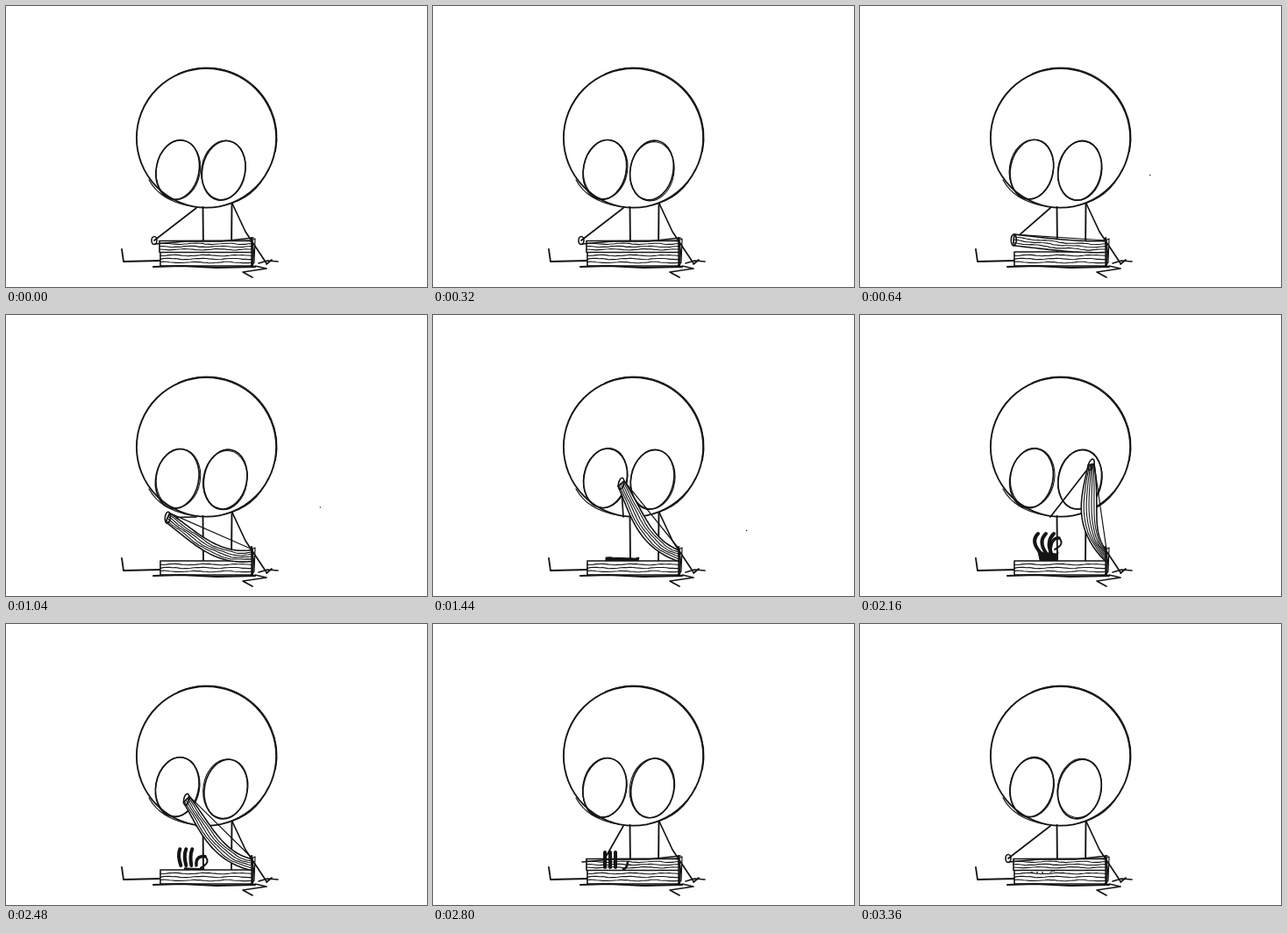
Animation of 480x320 px, one loop 3440 ms. Source, as an HTML page with a canvas:

```html
<!DOCTYPE html>
<html lang="en">
<head>
<meta charset="utf-8">
<title>Book with a claw</title>
<style>
html, body { margin: 0; width: 100%; height: 100%; overflow: hidden; background: #fff; }
canvas { display: block; }
</style>
</head>
<body>
<canvas id="c" width="480" height="320"></canvas>
<script>
const g = document.getElementById('c').getContext('2d');
const LOOP = 3440, STEP = 80, INK = '#141414';
const HINGE = { x: 280, y: 274 }, COVER = 105;

const mix = (a, b, k) => a + (b - a) * k;
const ramp = (t, from, to) => Math.min(1, Math.max(0, (t - from) / (to - from)));
const smooth = k => k * k * (3 - 2 * k);
const noise = n => { const v = Math.sin(n * 127.1) * 43758.5453; return (v - Math.floor(v)) * 2 - 1; };

function trace(points, width, fill) {
  g.beginPath();
  points.forEach(p => g.lineTo(p[0], p[1]));
  if (fill) { g.fillStyle = fill; g.fill(); }
  g.lineWidth = width;
  g.stroke();
}

function line(width, ...v) {
  const points = [];
  for (let i = 0; i < v.length; i += 2) points.push([v[i], v[i + 1]]);
  trace(points, width);
}

function bend(width, x0, y0, x1, y1, x2, y2) {
  g.beginPath();
  g.moveTo(x0, y0);
  g.quadraticCurveTo(x1, y1, x2, y2);
  g.lineWidth = width;
  g.stroke();
}

function oval(width, x, y, rx, ry, turn = 0) {
  g.beginPath();
  g.ellipse(x, y, rx, ry, turn, 0, 7);
  g.lineWidth = width;
  g.stroke();
}

// White board between two edges, with wavy wood grain.
function board(top, bottom, grains, seed) {
  trace([...top, ...bottom.slice().reverse(), top[0]], 1.6, '#fff');
  for (let k = 1; k <= grains; k++)
    trace(top.map((p, i) => {
      const wave = 0.6 * Math.sin(i * 0.6 + k + seed) + 0.3 * noise(i + k * 40);
      const q = bottom[i], v = k / (grains + 1);
      return [mix(p[0], q[0], v), mix(p[1], q[1], v) + wave];
    }), 1.1);
}

// The cover swings on its hinge, sags in the middle and thins towards the tip.
function coverShape(open) {
  const angle = Math.PI * (1 - 0.45 * open), sag = 22 * Math.min(1, open * 3.5);
  const dx = -Math.cos(angle), dy = Math.sin(angle);
  const tip = { x: HINGE.x - COVER * dx, y: HINGE.y - COVER * dy };
  const top = [], bottom = [];
  for (let i = 0; i <= 30; i++) {
    const u = i / 30, w = 1 - u;
    const drop = 3 * u * w * sag * (0.3 * w + u);
    const x = tip.x + COVER * u * dx - drop * dy;
    const y = tip.y + COVER * u * dy + drop * dx;
    const half = mix(mix(6.5, 3.5, open), 6.5, u) + 5 * open * open * Math.sin(Math.PI * u);
    const nx = mix(-dy, 0, u ** 3) * half, ny = mix(dx, 1, u ** 3) * half;
    top.push([x - nx, y - ny]);
    bottom.push([x + nx, y + ny]);
  }
  return { tip, top, bottom, angle };
}

function head(t) {
  oval(1.9, 228.5, 150.3, 79.6, 79.3);
  g.beginPath();
  g.arc(229, 150, 80, -2, 0.2);
  g.lineWidth = 1;
  g.stroke();
  bend(1.2, 163, 198, 176, 222, 211, 228);
  bend(1.2, 248, 227, 284, 220, 299, 186);

  const shift = 2 * ramp(t, 0, 640);
  [[196, 186], [248.2 + shift, 187.5]].forEach(([x, y], i) => {
    const wobble = k => 0.8 * noise(t / STEP * 3 + i * 50 + k + 1);
    oval(1.7, x + wobble(0), y + wobble(1), 24.4, 34.2, 0.2);
    oval(1.1, x + wobble(2), y + wobble(3), 25, 33.8, 0.16);
  });
}

function body(armX, armY) {
  line(1.9, 224.5, 229, 225, 280);
  line(1.9, 257.5, 226, 257, 280);
  line(1.7, 258, 225, 273, 257, 297, 293);
  line(1.7, 217, 230, armX, armY);
  line(1.8, 132, 277, 134, 291, 176, 290);
}

// The claw rises from the book, spreads, folds over the edge and sinks back.
function clawPose(t) {
  return {
    rise: ramp(t, 1280, 1760), spread: smooth(ramp(t, 1760, 2160)),
    fold: ramp(t, 2160, 2640), sink: ramp(t, 2800, 3360)
  };
}

function fingers({ rise, spread, fold, sink }) {
  const hook = spread * (1 - fold);
  const length = mix(mix(9, 22, spread), 17, fold) * (1 - sink);
  const y = mix(mix(294 - 18 * rise, 271, spread), 277, fold) + 6 * sink;
  for (let i = 0; i < 3; i++) {
    const x = mix(206 + 6 * i, 196 + 6 * i, fold), fan = 3 * (i - 1) * hook;
    bend(mix(4, 1.8, sink), x, y, x + fan - 9 * hook, y - length * 0.6, x + fan, y - length);
  }
}

function palm(pose) {
  const { rise, spread, fold } = pose;
  const height = mix(19, 13, spread) * rise * (1 - fold);
  const left = mix(197, 203, spread), width = mix(38, 23, spread);
  const shape = [[left + 3 * spread, 283]];
  for (let i = 0; i <= 8; i++)
    shape.push([left + width * i / 8, 282 - height * (0.88 + 0.12 * noise(i + 3))]);
  trace([...shape, [left + width - 2, 283]], 1, INK);
  fingers(pose);
  if (spread > 0) {
    const y = mix(270, 254, spread) + 16 * fold;
    bend(3.5, 217, 275, 216, y - 1, 227, y);
    bend(2, 227, y, 234, y + 7, 222, y + 13);
  }
}

function rightSide() {
  line(2.2, 280, 264, 282, 280, 281, 297);
  line(1.2, 278, 268, 284, 265, 283, 292, 279, 296);
  line(1.7, 288, 293, 298, 290, 310, 291);
  line(1.7, 297, 294, 303, 289);
  line(1.7, 284, 296, 297, 299, 270, 303, 281, 309);
}

function draw(t) {
  g.fillStyle = '#fff';
  g.fillRect(0, 0, 480, 320);
  g.strokeStyle = INK;
  g.lineCap = g.lineJoin = 'round';

  const open = smooth(ramp(t, 400, 2160)) * (1 - ramp(t, 2160, 2640) ** 2);
  const { tip, top, bottom, angle } = coverShape(open);
  const pose = clawPose(t), closed = open === 0, pinned = pose.fold === 1;
  const arm = { x: tip.x, y: tip.y };
  if (closed) { arm.x = pinned ? mix(196, 169, pose.sink) : 169; arm.y = 267; }

  head(t);
  body(arm.x, arm.y);
  if (pose.rise > 0 && !pinned) palm(pose);

  const row = y => top.map((p, i) => [mix(176, 280, i / 30), y]);
  board(row(280), row(296), 3, 1);
  line(2, 168, 297, 200, 296, 240, 298, 284, 297);
  board(top, bottom, Math.round(mix(3, 5, open)), 3);
  line(1.2, ...top[0], 281, 267);
  if (closed) line(1.7, 170, 271, 205, 268, 245, 268, 282, 264);
  if (!pinned || pose.sink > 0.5)
    oval(1.6, arm.x, arm.y, 3, closed ? 4.5 : 6.5, (Math.PI - angle) / 4);
  rightSide();

  if (pinned) {
    fingers(pose);
    bend(mix(2.6, 1, pose.sink), 222, mix(271, 282, pose.sink), 221, 279, 217, mix(279, 283, pose.sink));
  }

  // Drifting speck
  const fall = (t - 640) / 1120;
  if (fall >= 0 && fall <= 1) {
    g.fillStyle = INK;
    g.fillRect(330 + 7 * fall + 28 * Math.sin(Math.PI * fall), 192 + 74 * fall, 1.2, 1.2);
  }
}

const start = performance.now();
function frame() {
  draw(Math.floor((performance.now() - start) % LOOP / STEP) * STEP);
  requestAnimationFrame(frame);
}
frame();
</script>
</body>
</html>
```
